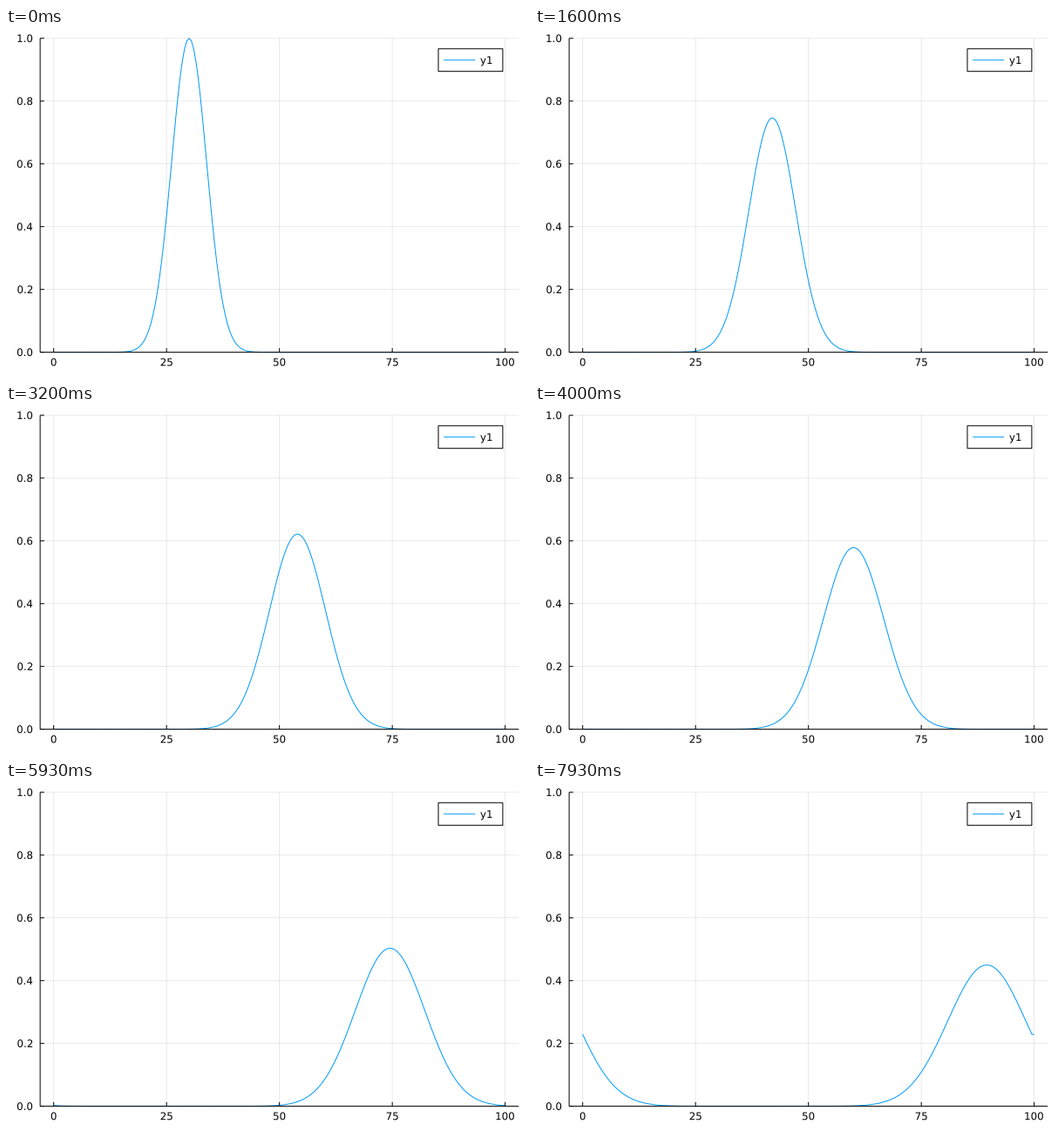
These frames come from a looping animation (600 px wide and 400 px high, 8 s). A matplotlib script:

```python
import numpy as np
import matplotlib.pyplot as plt
from matplotlib.animation import FuncAnimation
from matplotlib.patches import PathPatch, Rectangle
from matplotlib.textpath import TextPath
from matplotlib.transforms import Affine2D

W, H, DPI = 600, 400, 100
TICK_MS, LOOP_MS = 20, 8000
TICKS = LOOP_MS // TICK_MS
STEPS = 120                 # simulation steps per loop
LEFT, RIGHT, TOP, BOTTOM = 39.15, 588.19, 11.81, 371.61
PX = 72 / DPI               # points per pixel
BLUE = "#009afa"

START, SPEED = 30.0, 0.5    # pulse centre and its drift per step
VAR, SPREAD = 15.0, 0.0331  # initial variance and its relative growth per step
DX = 0.5
x = np.arange(0, 100 + DX, DX)
PERIOD = 100 - DX


def px(v):
    return LEFT + (v + 3) / 106 * (RIGHT - LEFT)


def py(v):
    return BOTTOM - v * (BOTTOM - TOP)


def pulse(n):
    """Drifting, spreading Gaussian whose outflow re-enters on the left."""
    centre = START + SPEED * n
    growth = 1 + SPREAD * n
    u = sum(np.exp(-(x + k * PERIOD - centre) ** 2 / (2 * VAR * growth))
            for k in (0, 1)) / np.sqrt(growth)
    u[-1] = u[-2]
    return u


fig = plt.figure(figsize=(W / DPI, H / DPI), dpi=DPI, facecolor="white")
ax = fig.add_axes([0, 0, 1, 1])
ax.set_xlim(0, W)
ax.set_ylim(H, 0)
ax.axis("off")


def line(xs, ys, color="black", width=1, z=4, **kw):
    return ax.plot(xs, ys, color=color, lw=width * PX, zorder=z, snap=False,
                   solid_capstyle="butt", **kw)[0]


def grid(xs, ys):
    line(xs, ys, width=0.8, z=1, alpha=0.1)


def label(tx, base, text, anchor):
    """Outline text; anchor 0, 0.5 or 1 puts its left, middle or right at tx."""
    path = TextPath((0, 0), text, size=11.85, prop={"family": "DejaVu Sans"})
    box = path.get_extents()
    move = Affine2D().translate(-box.x0 - anchor * box.width, 0)
    move.scale(1, -1).translate(tx, base)
    ax.add_patch(PathPatch(path, transform=move + ax.transData, fc="black",
                           lw=0, snap=False, zorder=6))


for v in range(0, 101, 25):
    grid([px(v)] * 2, [TOP, BOTTOM])
    line([px(v)] * 2, [BOTTOM, BOTTOM - 4.72])
    label(px(v), 387.2, str(v), 0.5)
for v in np.arange(6) / 5:
    grid([LEFT, RIGHT], [py(v)] * 2)
    line([LEFT, LEFT + 4.72], [py(v)] * 2)
    label(30.2, py(v) + 4.32, f"{v:.1f}", 1)
line([LEFT, LEFT], [TOP, BOTTOM])
line([LEFT, RIGHT], [BOTTOM, BOTTOM])

ax.add_patch(Rectangle((496, 23.8), 73.9, 25.9, fc="white", ec="black",
                       lw=PX, snap=False, zorder=5))
line([502.2, 538.2], [36.76] * 2, BLUE, z=6)
label(544.3, 41.08, "y1", 0)

curve = line(px(x), py(pulse(0)), BLUE, z=3)


def update(tick):
    # the picture holds between simulation steps
    curve.set_ydata(py(pulse((tick + 1) * STEPS // TICKS)))
    return curve,


anim = FuncAnimation(fig, update, frames=TICKS, interval=TICK_MS,
                     init_func=lambda: update(0), repeat=True, repeat_delay=0)
plt.show()
```
